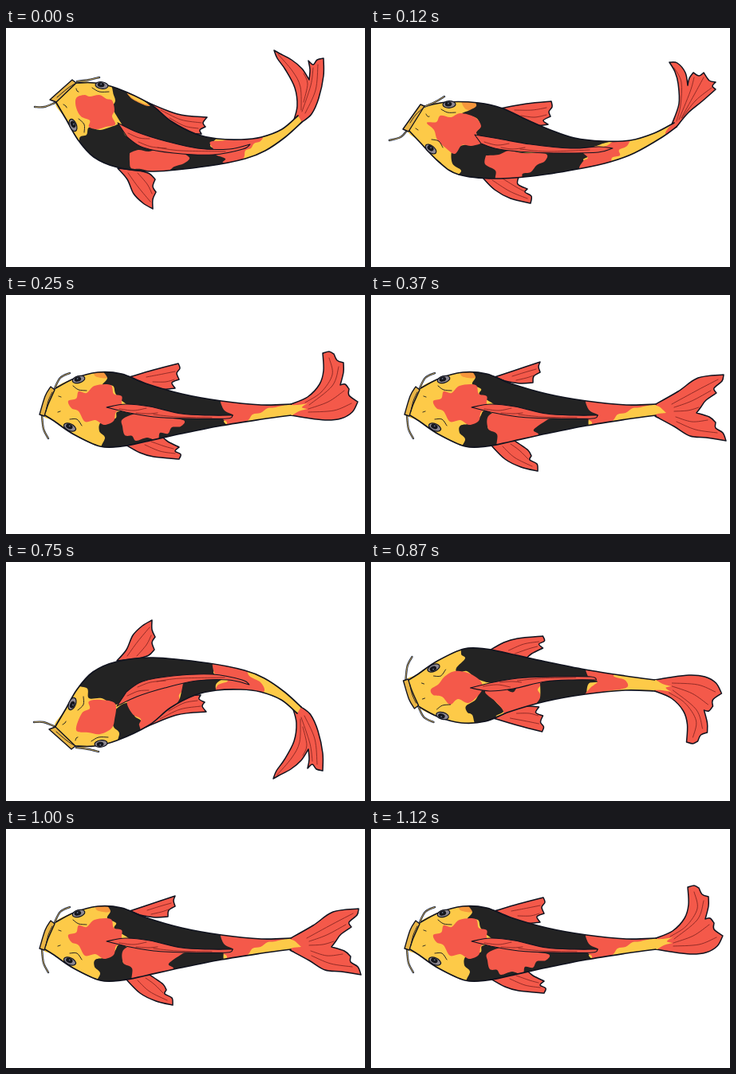
Recreate the animation shown at these times as an HTML page. Size 450x300 px, loop 1.25 s.

```html
<!DOCTYPE html>
<html lang="en">
<head>
<meta charset="utf-8">
<title>Swimming koi</title>
<style>
html, body { margin: 0; width: 100%; height: 100%; overflow: hidden; background: #fff; }
svg { display: block; width: 100vw; height: 100vh; }
</style>
</head>
<body>
<svg id="stage" viewBox="0 0 450 300"></svg>
<script>
const RED = '#f4594a', BLACK = '#232323', YELLOW = '#fdca48', INK = '#10131f', ORANGE = '#f6963c';

// Smooth curve through "x,y" points; "!" marks a sharp corner.
function curve(text, closed) {
  const pts = text.trim().split(/\s+/).map(p => {
    const [x, y] = p.replace('!', '').split(',').map(Number);
    return { x, y, sharp: p.endsWith('!') };
  });
  const n = pts.length;
  const at = i => closed ? pts[(i + n) % n] : pts[Math.max(0, Math.min(n - 1, i))];
  let d = `M${pts[0].x},${pts[0].y}`;
  for (let i = 0; i < (closed ? n : n - 1); i++) {
    const a = at(i), b = at(i + 1);
    const p = a.sharp ? a : at(i - 1), q = b.sharp ? b : at(i + 2);
    const c = [a.x + (b.x - p.x) / 6, a.y + (b.y - p.y) / 6, b.x - (q.x - a.x) / 6, b.y - (q.y - a.y) / 6];
    d += 'C' + c.map(v => v.toFixed(1)).join(' ') + ` ${b.x} ${b.y}`;
  }
  return d + (closed ? 'Z' : '');
}

const fill = (pts, color) => `<path d="${curve(pts, true)}" fill="${color}"/>`;
const line = (pts, w = 0.8, color = INK) =>
  `<path d="${curve(pts)}" fill="none" stroke="${color}" stroke-width="${w}"/>`;
const shape = (pts, color, w = 1.5) =>
  `<path d="${curve(pts, true)}" fill="${color}" stroke="${INK}" stroke-width="${w}"/>`;
const lines = list => list.map(p => line(p, 0.8, '#7a211f')).join('');
const eye = ([x, y, turn]) => `<g transform="translate(${x} ${y}) rotate(${turn})">
  <ellipse rx="8" ry="4.3" fill="#8d8891" stroke="${INK}" stroke-width="1.2"/>
  <ellipse cx="-1" cy="-.6" rx="4.4" ry="3" fill="#15161d"/>
  <circle cx="-1" cy="-1.4" r=".9" fill="#69758c"/></g>`;
const whisker = pts => line(pts, 2.4, '#14254d') + line(pts, 0.9, '#d9ac45');

const bent = {
  top: '87,69 112,69 140,76 180,95 207,117 238,133 265,139 295,140 320,137 346,127 366,110',
  low: '371,118 350,137 325,154 300,164 255,173 185,180 140,175 110,162 90,140 75,114 62,92',
  mouth: '55,90! 83,65! 88,69! 63,93!',
  tail: '360,118! 365,98 362,75 350,52 340,38 336,28! 343,32 358,40 371,51 380,65! 381,52 379,41! 385,46 390,40 398,38! 398,60 392,88 383,108 371,118!',
  tailLines: ['341,33 359,54 369,74 370,103', '385,50 382,72 371,105', '391,46 388,78 375,107', '373,57 378,70 373,93'],
  fins: ['172,91! 215,108 252,112! 247,119 250,124! 243,128 245,133! 225,131 200,118!',
    '140,176! 152,190 160,208 172,220 184,227! 184,215 188,206! 184,199 187,190! 180,183 168,179!'],
  finLines: ['194,103 219,115 245,119', '205,113 224,123 241,126', '153,182 166,200 181,218', '165,182 177,196 183,208'],
  dorsal: '140,119! 165,131 200,142 240,151 280,152 306,146! 297,152 260,159 210,157 172,150 152,137!',
  dorsalLines: ['153,132 167,138 180,139', '166,143 182,149 201,151', '190,150 220,154 275,155'],
  eyes: [[120, 72, 7], [84, 122, 68]],
  marks: ['108,75 117,80 129,80', '91,114 98,121 98,131', '88,76 89,79 91,80', '72,96 75,98 76,100', '64,87 77,76 86,70'],
  whiskers: ['89,67 104,65 117,62', '61,94 48,99 36,99']
};

const poseA = { ...bent, patches: [
  ['137,68 134,80 137,91 134,101 144,119 152,132 175,146 230,157 272,157 256,148 264,134 230,120 180,84', BLACK],
  ['92,139 101,134 104,125 118,128 135,123 144,121 152,137 185,152 230,158 262,158 275,163 272,180 190,190 130,184 100,164', BLACK],
  ['155,157! 166,153 179,155 193,151 205,154 219,156 230,163 223,170 211,174 203,179 184,180 169,177 157,176 155,167', RED],
  ['256,143 274,141 295,135 320,136 319,142 311,145 307,151 300,154 298,163 289,170 272,169 275,164 263,159 260,152', RED],
  ['88,88 98,84 105,86 117,84 126,89 133,91 136,103 133,111 137,121 125,124 114,127 104,124 105,116 94,111 88,100', RED],
  ['151,81! 169,89 181,98! 174,97 158,89', ORANGE], ['153,83! 168,89 179,96! 173,95 160,89', YELLOW],
] };

const poseB = {
  top: '65,99 95,93 135,94 165,101 195,115 225,128 255,138 290,142 325,141 355,132 380,119',
  low: '383,124 365,137 330,157 300,168 265,176 210,185 155,189 110,184 85,168 60,142 46,127',
  mouth: '40,127! 62,96! 67,98! 47,130!',
  tail: '377,121! 386,95 385,70 381,55 374,43! 384,44 394,56 397,72! 399,63 404,56! 411,60 417,56! 424,66 432,68! 428,73 432,77! 415,92 398,106 383,124!',
  tailLines: ['380,50 389,68 388,97 383,117', '405,62 400,80 386,115', '417,62 405,84 389,113', '427,75 407,91 390,113'],
  fins: ['162,101! 195,95 226,92! 227,99 223,105 225,111! 216,116 222,121! 205,122 185,112!',
    '140,188! 155,203 175,214 200,220! 201,211 193,206 196,202! 184,196 185,187! 165,186!'],
  finLines: ['180,103 202,103 220,100', '188,110 205,112 220,109', '152,191 174,205 196,214', '165,189 181,199 192,205'],
  dorsal: '130,134! 160,139 200,146 250,151 285,149 303,151! 285,156 240,157 200,156 160,152 138,145!',
  dorsalLines: ['142,143 158,147 173,145', '163,150 178,152 193,150', '187,152 220,155 274,153'],
  eyes: [[98, 96, -2], [75, 152, 38]],
  marks: ['88,102 96,106 106,106', '76,140 85,142 90,150', '69,108 71,111 73,111', '56,126 59,128', '49,119 56,109 66,100'],
  whiskers: ['66,99 80,93 92,86', '45,129 37,137 23,141'],
  patches: [
    ['112,90! 136,91 134,104 119,102', ORANGE],
    ['132,88 132,98 124,103 114,108 132,113 137,124 132,132 145,143 205,156 278,159 276,151 288,146 301,139 245,128 195,107 163,95', BLACK],
    ['102,153 116,147 139,143 158,150 201,157 276,157 266,165 273,171 258,181 200,193 143,195 108,189 113,179 102,170', BLACK],
    ['144,160! 160,159 173,154 190,157 219,158 218,167 208,172 200,181 190,183 187,191 158,192 156,179 143,171', RED],
    ['266,156 280,155 280,149 295,148 307,140 324,138 321,148 311,153 312,160 302,163 298,174 263,178 266,167 272,163', RED],
    ['70,119 82,118 87,110 100,112 112,107 130,112 138,123 132,132 140,143 126,148 114,147 105,158 93,150 83,140 79,128', RED],
    ['384,117! 374,124 369,133 376,138! 390,122!', RED]
  ]
};

const straight = {
  top: '59,119 85,105 115,97 145,99 175,111 220,124 270,133 320,138 357,137',
  low: '357,151 320,156 270,164 220,174 175,184 145,190 118,190 85,175 60,158 47,150',
  mouth: '42,150! 49,127 56,115! 61,119! 53,137 48,152!',
  dorsal: '126,141! 150,137 180,140 220,149 255,151 284,151! 277,155 230,155 185,153 150,147!',
  dorsalLines: ['142,143 160,145 176,142', '163,148 178,149 190,148', '185,150 215,153 258,154'],
  eyes: [[91, 106, -16], [80, 166, 24]],
  marks: ['84,114 91,119 101,120', '80,156 89,156 95,164', '66,127 69,128', '65,147 68,146', '50,146 53,133 58,122'],
  whiskers: ['61,117 68,104 80,98', '45,151 47,168 53,180']
};
const headRed = ['78,133 88,130 91,121 101,123 111,114 131,113 135,124 145,127 145,136 149,142 138,147 135,158 123,163 112,157 99,159 91,146 82,142', RED];
const rearRed = ['270,128 295,133 350,136 338,141 328,142 319,148 309,150 301,159 275,170 277,160 272,155 285,151 273,144', RED];
const upperBlack = ['128,92 131,103 127,112 138,118 136,125 151,135 180,152 272,157 285,150 274,143 271,126 220,116 170,101', BLACK];

const poseC = { ...straight,
  tail: '357,137! 378,128 393,112 398,95 397,73! 405,71 411,74! 415,82 423,85! 423,97 419,113! 425,112 430,118! 430,126 441,134! 434,147 420,155 400,157 375,154 357,151!',
  tailLines: ['405,79 409,100 395,122 375,135', '417,90 409,114 380,138', '424,120 404,134 379,143', '433,136 411,145 379,147'],
  fins: ['155,103! 185,94 216,86! 218,92 214,98 217,106! 208,110 212,117! 190,118 170,110!',
    '150,188! 168,198 185,203 217,206! 219,200 212,196 217,191! 203,184 196,178! 175,182!'],
  finLines: ['176,103 197,99 212,96', '184,109 200,109 211,106', '174,188 193,196 212,199', '182,184 199,190 210,193'],
  wedge: '352,138! 366,138 378,136! 371,141 378,143! 367,146 359,151! 352,151!',
  patches: [
    ['110,94! 126,95 127,104 112,102', ORANGE],
    ['121,90 127,104 121,113 134,114 138,125 151,137 180,152 272,157 285,150 274,143 271,126 220,116 170,101', BLACK],
    ['119,160 137,155 142,146 180,151 285,152 273,158 276,170 220,182 145,198 120,194 124,179 117,171', BLACK],
    ['146,156 164,149 187,153 222,157 219,165 208,166 203,174 193,173 190,183 177,179 163,183 158,177 149,176 146,165', RED],
    rearRed, headRed
  ]
};

const poseD = { ...straight,
  tail: '355,138! 385,121 410,104 442,100! 440,108 430,117 433,123! 420,132 414,140 408,148! 424,153 432,160! 432,167 441,173 445,183! 420,179 400,177 380,165 356,152!',
  tailLines: ['435,106 410,119 377,137', '426,120 402,133 380,141', '422,157 402,159 382,153', '434,173 407,169 383,159', '411,141 397,145 380,146'],
  fins: ['155,103! 185,93 212,84! 210,90 212,97! 204,102 203,110! 187,111 168,108!',
    '150,188! 168,206 188,216 209,221! 208,212 199,207 201,202! 197,195 186,187 177,181!'],
  finLines: ['177,102 193,97 207,93', '182,107 195,104 204,101', '165,190 180,204 202,215', '175,187 186,195 197,206'],
  wedge: '352,138! 361,140 370,148! 360,149 355,151! 348,151!',
  patches: [
    ['112,94! 131,94 130,104 114,102', ORANGE], upperBlack,
    ['112,164 126,161 136,154 142,145 155,151 149,159 147,168 160,174 161,196 115,197 118,181 111,173', BLACK],
    ['148,151 172,146 222,155 220,165 208,167 210,174 204,187 161,196 158,175 147,168', RED],
    ['222,156! 283,151! 273,156 274,173! 205,187 210,175 204,169', BLACK],
    rearRed, headRed
  ]
};

// Downward bends reuse the mirrored linework with their own markings.
const poseE = { ...poseC, flip: [-1.5, -1], patches: [
  ['119,102 113,115 118,121 107,133 109,140 120,137 136,148 170,153 280,151 272,145 273,130 220,119 165,102', BLACK],
  ['119,181 131,173 139,161 153,167 155,174 166,187 157,193 156,201 133,205 127,192 121,189', BLACK],
  ['143,163 155,153 185,150 213,151 209,160 212,167 208,181 171,196 164,194 166,187 156,175', RED],
  ['212,152! 282,147! 272,154 270,170! 207,185 212,170', BLACK],
  ['170,158 182,156 179,163 173,162', BLACK],
  ['271,130 301,138 305,144 318,148 322,156 312,160 295,162 268,169 275,158 284,150 273,145', RED],
  ['75,160 85,153 92,144 105,137 121,139 136,148 140,158 134,168 122,177 109,172 99,179 89,169 78,167', RED]
] };

const poseX = { ...bent, flip: [-1, 0], patches: [
  ['91,151 102,159 104,171 120,171 138,179 165,165 230,146 270,146 260,139 263,120 190,112 130,116', BLACK],
  ['132,193 145,179 160,177 161,193 170,201 163,220 139,232 142,215 135,207', BLACK],
  ['153,171 185,151 222,146 224,158 217,167 215,181 176,211 167,205 169,197 158,190', RED],
  ['223,147! 275,145! 263,154 266,170! 211,187 218,171', BLACK],
  ['262,120 297,129 305,143 319,151 323,163 301,168 266,168 265,155 278,149 262,141', RED],
  ['88,211 95,190 105,184 104,175 119,173 137,178 136,198 132,209 118,216 103,214', RED]
] };

const poses = { A: poseA, B: poseB, C: poseC, D: poseD, E: poseE, X: poseX };

function drawPose(key) {
  const p = poses[key];
  const body = curve(p.top + '! ' + p.low.replace(' ', '! '), true);
  const mirror = p.flip ? `translate(${p.flip[0]} ${300 + p.flip[1]}) scale(1 -1)` : '';
  // Markings of mirrored poses are given upright, so undo the mirror around them.
  const marks = `<g clip-path="url(#body${key})"><g transform="${p.flip ? `translate(${-p.flip[0]} ${300 + p.flip[1]}) scale(1 -1)` : ''}">
    ${p.patches.map(q => fill(...q)).join('')}</g></g>`;
  return `<g id="pose${key}" transform="${mirror}" stroke-linejoin="round" stroke-linecap="round">
    <clipPath id="body${key}"><path d="${body}"/></clipPath>
    ${p.fins.map(f => shape(f, RED)).join('')}${lines(p.finLines)}
    ${shape(p.tail, RED)}${lines(p.tailLines)}
    <path d="${body}" fill="${YELLOW}"/>
    ${p.wedge ? fill(p.wedge, YELLOW) : ''}${marks}
    ${line(p.top, 1.7)}${line(p.low, 1.7)}
    ${shape(p.dorsal, RED, 1.1)}${lines(p.dorsalLines)}
    ${p.eyes.map(eye).join('')}
    ${p.whiskers.map(whisker).join('')}
    ${shape(p.mouth, '#e9b545', 1.4)}
    ${p.marks.map(m => line(m, 0.9)).join('')}
  </g>`;
}

const stage = document.getElementById('stage');
stage.innerHTML = Object.keys(poses).map(drawPose).join('');
const groups = Object.keys(poses).map(key => [key, document.getElementById('pose' + key)]);

const LOOP = 1250;
const starts = [0, 120, 250, 370, 620, 750, 870, 1000, 1120];
const order = 'ABCDEXEDC';

function render(time) {
  const t = time % LOOP;
  const now = order[starts.filter(s => s <= t).length - 1];
  for (const [key, g] of groups) g.style.display = key === now ? '' : 'none';
}

const begin = performance.now();
function tick() {
  render(performance.now() - begin);
  requestAnimationFrame(tick);
}
render(0);
requestAnimationFrame(tick);
</script>
</body>
</html>
```
